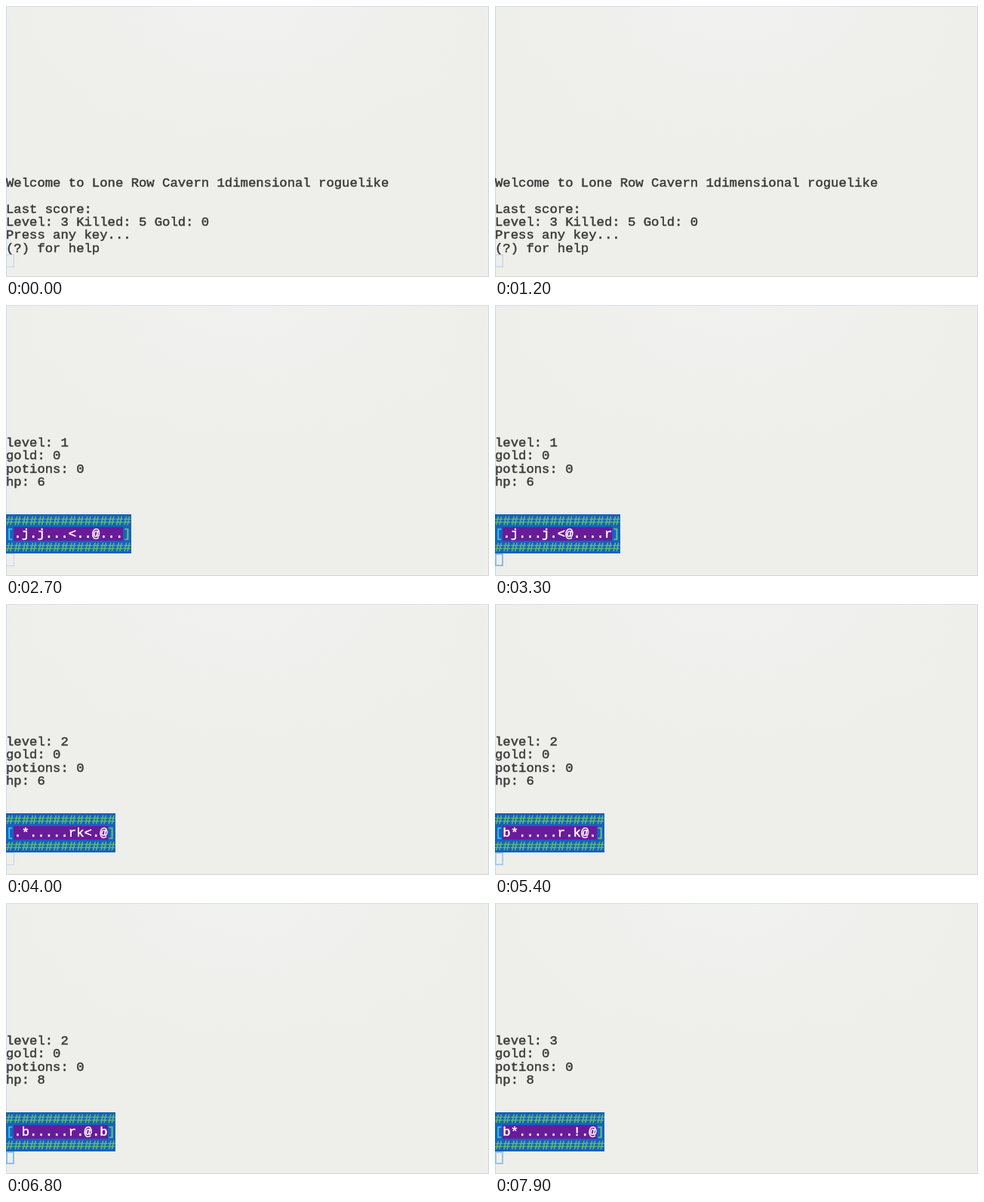
Recreate the animation shown at these times as an HTML page. Size 640 px wide and 360 px high, loop 8000 ms.

```html
<!DOCTYPE html>
<html lang="en">
<head>
<meta charset="utf-8">
<title>Terminal roguelike</title>
<style>
  html, body { margin: 0; width: 100%; height: 100%; overflow: hidden; }
  body {
    position: relative;
    background: radial-gradient(ellipse 330px 190px at 320px 0, #f1f1f0, #eeeeea) #eeeeea;
  }
  #frame {
    position: absolute; inset: 0;
    border: 1px solid; border-color: #cfe2f2 #d3d6d8 #d3d6d8 #c3dcf2;
  }
  /* The line height exceeds the row height, which sets the glyphs lower in their row. */
  #screen {
    position: absolute; left: 0; bottom: 30px; margin: 0;
    font: 17.25px/19.33px "Courier New", "Liberation Mono", monospace;
    -webkit-text-stroke: .5px;
    font-variant-ligatures: none;
    color: #3b3b3b;
  }
  #screen div, #screen span { height: 17.333px; }
  #screen span { display: inline-block; vertical-align: top; }
  .wall { background: #1761bf; color: #62bf70; }
  .door { background: #1761bf; color: #35c5e0; }
  .floor { background: #6a1b9a; color: #fff; }
  #cursor {
    position: absolute; left: 0; top: 330px; width: 11px; height: 17px;
    box-sizing: border-box; border: 1px solid #bfdaf1;
  }
  #glow { position: absolute; inset: -1px; border: 2px solid #86bff0; }
</style>
</head>
<body>
<div id="frame"></div>
<pre id="screen"></pre>
<div id="cursor"><div id="glow"></div></div>
<script>
const LOOP = 8000, BLINK = 1210, BLINK_START = 460;
const screen = document.getElementById('screen');
const glow = document.getElementById('glow');

const HIT = 'You hit the kobold';
const KILL = 'You killed the kobold!';
const WELCOME = [
  'Welcome to Lone Row Cavern 1dimensional roguelike', '',
  'Last score:', 'Level: 3 Killed: 5 Gold: 0', 'Press any key...', '(?) for help'
];

// start time, level, hp, floor between the doors, messages
const turns = [
  [1600, 1, 6, '.j.....<....@.'],
  [2400, 1, 6, '.jj....<...@..'],
  [2700, 1, 6, '.j.j...<..@...'],
  [3000, 1, 6, '.j..j..<.@...r'],
  [3200, 1, 6, '.j...j.<@....r'],
  [3500, 1, 6, '.*j...j@.....r'],
  [4000, 2, 6, '.*.....rk<.@'],
  [4800, 2, 6, 'b*.....r.k@.'],
  [5500, 2, 6, 'b*.....r.k@.', HIT],
  [6400, 2, 8, '.b.....r.<@.', HIT, KILL],
  [6700, 2, 8, '.b.....r.@.b'],
  [7500, 3, 8, 'b*.......!.@']
];

const line = html => `<div>${html}</div>`;
const span = (cls, text) => `<span class="${cls}">${text.replace(/</g, '&lt;')}</span>`;

function dungeon([, level, hp, floor, ...messages]) {
  const wall = span('wall', `<b>${'#'.repeat(floor.length + 2)}</b>`.replace(/<\/?b>/g, ''));
  return [
    `level: ${level}`, 'gold: 0', 'potions: 0', `hp: ${hp}`, '', ...messages, '',
    wall, span('door', '[') + span('floor', floor) + span('wall', ']'), wall
  ];
}

const clamp = x => Math.min(1, Math.max(0, x));

function cursorLevel(t) {
  const p = (t - BLINK_START + BLINK) % BLINK;
  const rise = 1 - (1 - clamp(p / 400)) ** 3;
  return rise * (1 - clamp((p - 580) / 180));
}

let shown;
function draw(now) {
  const t = now % LOOP;
  const turn = turns.findLast(s => s[0] <= t) || null;
  if (turn !== shown) {
    shown = turn;
    screen.innerHTML = (turn ? dungeon(turn) : WELCOME).map(line).join('');
  }
  glow.style.opacity = cursorLevel(t);
}

const start = performance.now();
function tick() {
  draw(performance.now() - start);
  requestAnimationFrame(tick);
}
tick();
</script>
</body>
</html>
```
